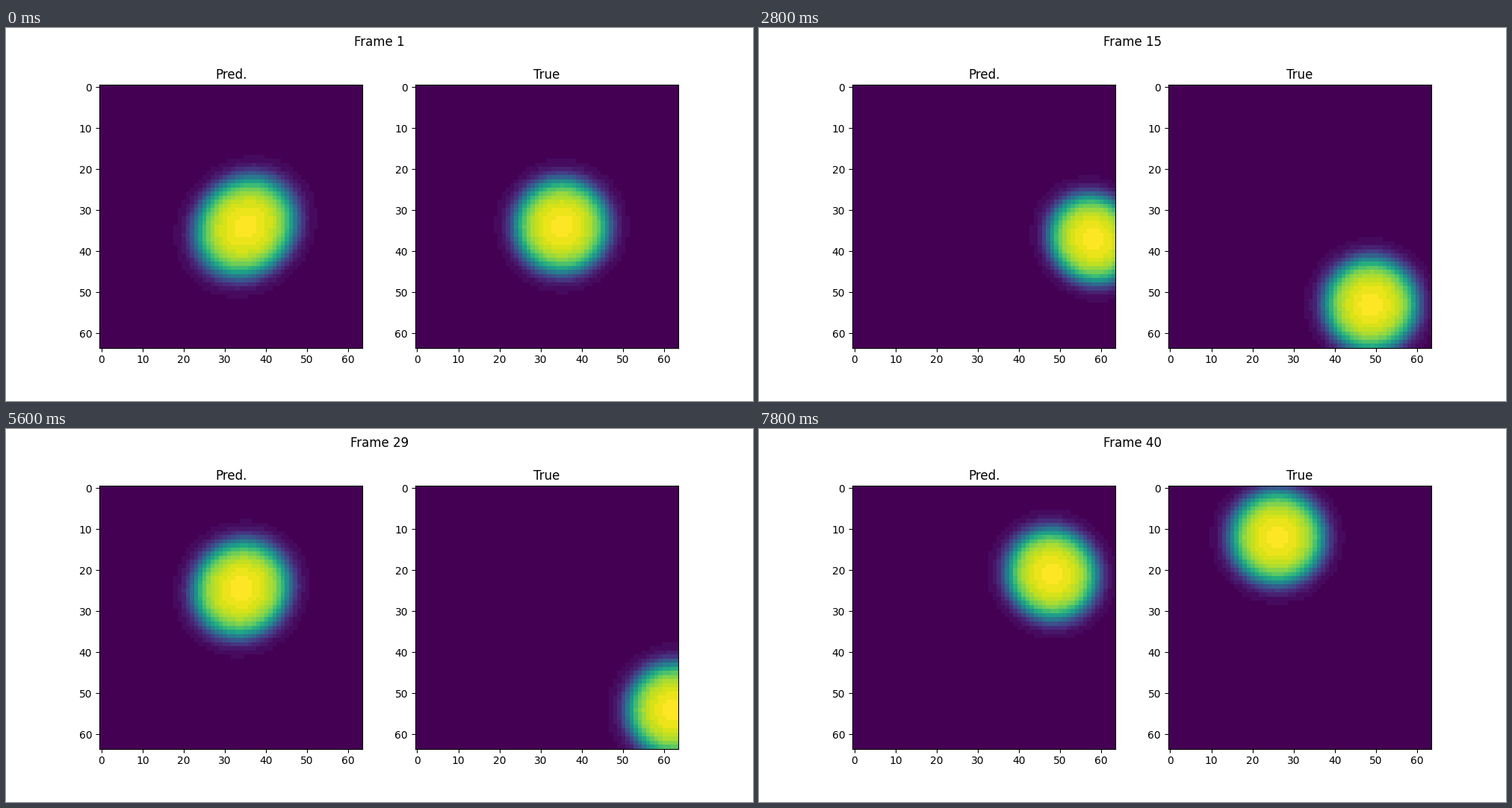
These frames come from a looping animation (1000x500 px, 8 s). A matplotlib script:

```python
import numpy as np
import matplotlib.pyplot as plt
from matplotlib.animation import FuncAnimation

FRAMES = 40
INTERVAL = 200
SIZE = 64
WALL = SIZE - 1  # the ball centre bounces between 0 and WALL
LEVELS = 32      # shading steps
cols, rows = np.meshgrid(np.arange(SIZE), np.arange(SIZE))

# Key points of the predicted path; the sign flips after the corner bounce.
KEY_T = np.array([1, 10, 15, 24, 29, 33, 40])
KEY_X = np.array([35, -31, -58, -40, -34, -45.5, -48])
KEY_Y = np.array([34, -22, -37, -50, -24.5, -11, -21])


def fold(u):
    """Reflect an unbounded coordinate between the two walls."""
    u = abs(u) % (2 * WALL)
    return min(u, 2 * WALL - u)


def hermite(t, ts, vs):
    """Smooth curve through the points (ts, vs)."""
    slopes = np.gradient(vs, ts)
    i = int(np.clip(np.searchsorted(ts, t, side="right") - 1, 0, len(ts) - 2))
    h = ts[i + 1] - ts[i]
    s = (t - ts[i]) / h
    return ((1 + 2 * s) * (1 - s) ** 2 * vs[i]
            + s * (1 - s) ** 2 * h * slopes[i]
            + s * s * (3 - 2 * s) * vs[i + 1]
            + s * s * (s - 1) * h * slopes[i + 1])


def ball(x, y, size=1.0, stretch=0.0):
    """Domed ball with a soft rim, shaded in discrete steps."""
    dx, dy = cols - x, rows - y
    rising = (dx - dy) / np.sqrt(2) / (size * (1 + stretch))
    falling = (dx + dy) / np.sqrt(2) / (size * (1 - stretch))
    r = np.hypot(rising, falling)
    value = np.exp(-0.002 * r ** 2) / (1 + np.exp((r - 11.5) / 1.3))
    return np.round(value * LEVELS) / LEVELS


def true_image(step):
    t = step - 1
    return ball(fold(35.05 - 8.025 * t), fold(33.85 - 7.638 * t))


def pred_image(step):
    t = step - 1
    wobble = np.cos(2 * np.pi * t / 28) * np.exp(-t / 40)
    return ball(abs(hermite(step, KEY_T, KEY_X)),
                abs(hermite(step, KEY_T, KEY_Y)),
                0.99 + 0.07 * wobble, 0.06 * wobble)


fig, axes = plt.subplots(1, 2, figsize=(10, 5), dpi=100)
heading = fig.suptitle("Frame 1")
panels = []
for ax, name, image in zip(axes, ("Pred.", "True"), (pred_image, true_image)):
    ax.set_title(name)
    panels.append((ax.imshow(image(1), cmap="viridis", vmin=0, vmax=1), image))


def update(i):
    step = i + 1
    heading.set_text(f"Frame {step}")
    for artist, image in panels:
        artist.set_data(image(step))
    return [heading] + [artist for artist, _ in panels]


anim = FuncAnimation(fig, update, frames=FRAMES, interval=INTERVAL,
                     repeat=True, repeat_delay=0, blit=False)
plt.show()
```
